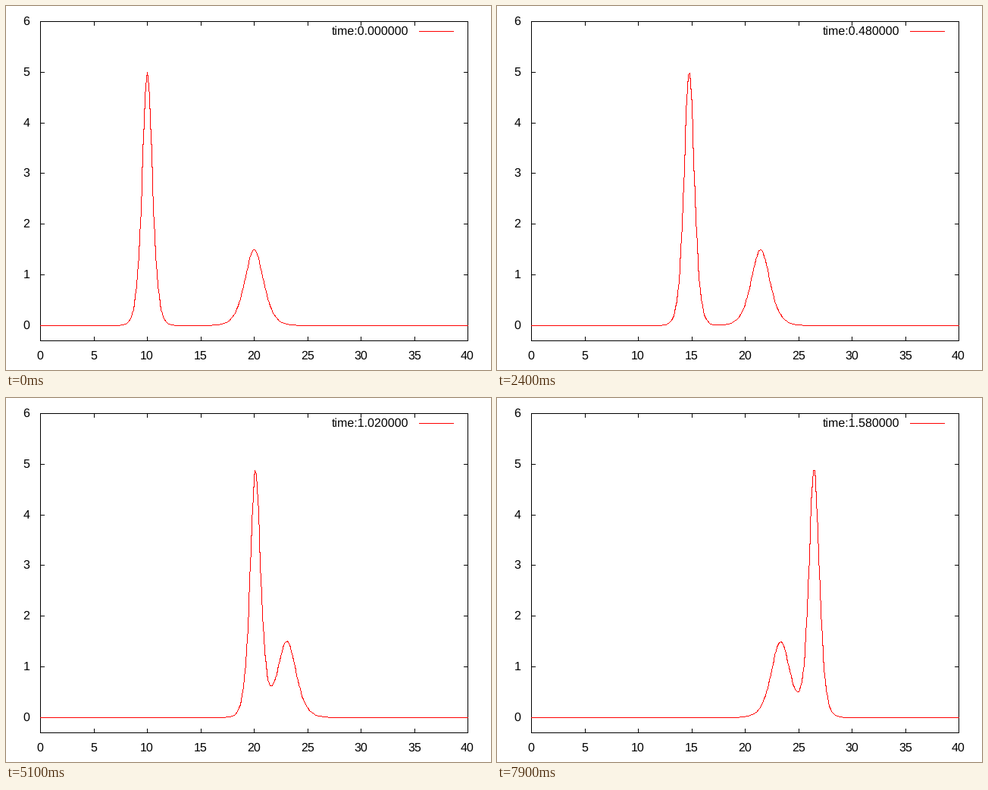
Animation of 640 by 480 pixels, one loop 8 s. Source, as a matplotlib script:

```python
import numpy as np
import matplotlib.pyplot as plt
from matplotlib.animation import FuncAnimation

W, H, DPI = 640, 480, 100
FRAMES, STEP, INTERVAL = 80, 0.02, 100
LEFT, RIGHT, TOP, BOTTOM = 45, 609, 20, 441
PX = 72 / DPI  # one pixel in points
RED = "#ff0000"

plt.rcParams["font.family"] = "Liberation Sans"
plt.rcParams["text.hinting"] = "none"

# Integer data coordinates are pixel centres.
fig = plt.figure(figsize=(W / DPI, H / DPI), dpi=DPI, facecolor="white")
ax = fig.add_axes([0, 0, 1, 1])
ax.axis("off")


def snap(v):
    return np.floor(np.asarray(v) + 0.5)


def to_px(x):
    return snap(LEFT + x / 40 * (RIGHT - LEFT))


def to_py(y):
    return snap(BOTTOM - (y + 0.3) / 6.3 * (BOTTOM - TOP))


def line(xs, ys, color="black"):
    ax.plot(xs, ys, color=color, lw=PX, snap=False, solid_capstyle="projecting",
            solid_joinstyle="miter", zorder=2)


def label(x, y, text, ha):
    return ax.text(x, y, text, ha=ha, va="baseline", fontsize=16 * PX)


def two_solitons(x, t):
    """KdV solution u = 2 (ln F)'' for an overtaking pair."""
    k1, k2 = np.sqrt(10), np.sqrt(3)
    a = ((k1 - k2) / (k1 + k2)) ** 2
    e1 = np.exp(k1 * (x - 10 - 9.92 * t))
    e2 = np.exp(k2 * (x - 20 - 3 * t)) / a
    e12 = a * e1 * e2
    k12 = k1 + k2
    f = 1 + e1 + e2 + e12
    f1 = k1 * e1 + k2 * e2 + k12 * e12
    f2 = k1**2 * e1 + k2**2 * e2 + k12**2 * e12
    return 2 * (f2 / f - (f1 / f) ** 2)


def ripple(x, t):
    """Faint start-up wave left of the tall pulse."""
    if t >= 0.36:
        return 0
    envelope = np.exp(-(((x - 5.8) / 3.2) ** 2))
    return 0.0093 * np.sin(np.pi * t / 0.36) * envelope * np.cos(2 * np.pi * (x - 5.6) / 2.2)


grid = np.linspace(0, 40, 401)
cols = np.arange(LEFT, RIGHT + 1)
edges = np.arange(LEFT, RIGHT + 2) - 0.5


def pixel_runs(t):
    """Top and bottom edge of a one-pixel curve in every column."""
    rows = to_py(two_solitons(grid, t) + ripple(grid, t))
    mid = np.interp(cols, to_px(grid), rows)
    side = np.interp(edges, to_px(grid), rows)
    span = np.array([side[:-1], mid, side[1:]])
    lo, hi = np.ceil(span.min(axis=0)), np.floor(span.max(axis=0))
    empty = lo > hi
    lo[empty] = hi[empty] = snap(mid[empty])
    return lo - 0.5, hi + 0.5


# Frame, ticks and labels
line([LEFT, RIGHT, RIGHT, LEFT, LEFT], [TOP, TOP, BOTTOM, BOTTOM, TOP])
for v in range(0, 41, 5):
    x = to_px(v)
    line([x, x], [BOTTOM, BOTTOM - 5])
    line([x, x], [TOP, TOP + 5])
    label(x - 0.5, 465.5, str(v), "center")
for v in range(7):
    y = to_py(v)
    line([LEFT, LEFT + 5], [y, y])
    line([RIGHT, RIGHT - 5], [y, y])
    label(31, y + 4.5, str(v), "right")

line([545, 590], [33, 33], RED)
clock = label(530.5, 37.5, "", "right")

top, bottom = pixel_runs(0)
curve = ax.stairs(bottom, edges, baseline=top, fill=True, color=RED, lw=0,
                  antialiased=False, snap=False, zorder=3)
ax.set(xlim=(-0.5, W - 0.5), ylim=(H - 0.5, -0.5))


def update(i):
    t = i * STEP
    top, bottom = pixel_runs(t)
    curve.set_data(bottom, edges, top)
    clock.set_text(f"time:{t:.6f}")
    return curve, clock


anim = FuncAnimation(fig, update, frames=FRAMES, interval=INTERVAL,
                     repeat=True, repeat_delay=0, blit=False)
plt.show()
```
